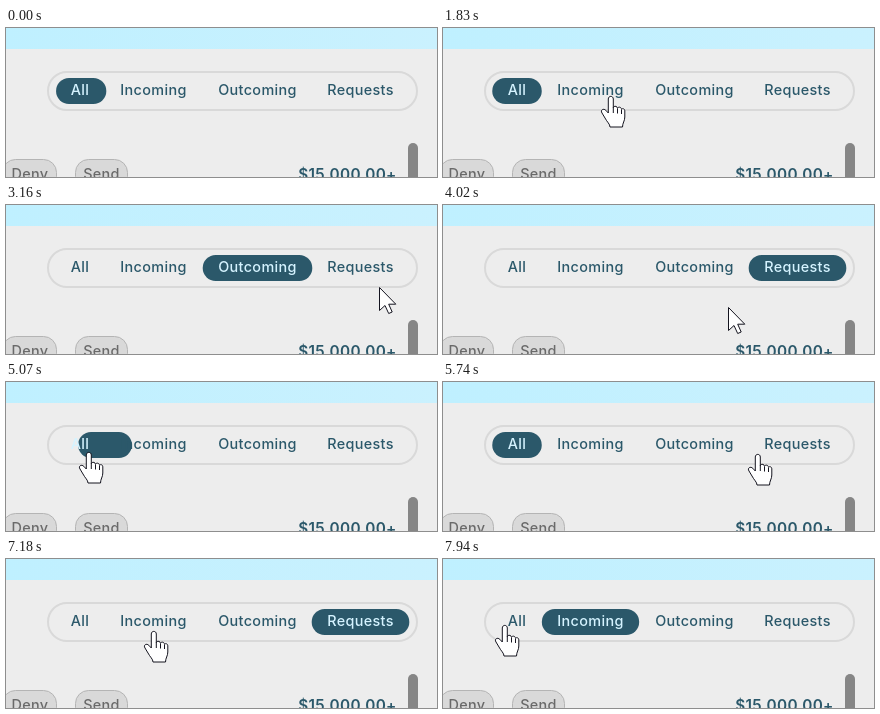
An HTML page for the animation above (8 s loop, 431 by 149 pixels).

```html
<!DOCTYPE html>
<html lang="en">
<head>
<meta charset="utf-8">
<title>Sliding tab filter</title>
<style>
  html, body { margin: 0; width: 100%; height: 100%; overflow: hidden; background: #ededed; }
  svg { display: block; }
  text {
    font: 500 14.4px Inter, "Open Sans", sans-serif;
    letter-spacing: .35px;
    text-anchor: middle;
    fill: #2b586a;
  }
  .button rect { fill: #d9d9d9; stroke: #b4b4b4; }
  .button text { fill: #6a6a6a; }
  .total { font-size: 15.3px; font-weight: 600; }
  #cursor path { fill: #fff; stroke: #14141f; stroke-linejoin: round; }
</style>
</head>
<body>
<svg width="431" height="149" viewBox="0 0 431 149">
  <defs>
    <linearGradient id="sky">
      <stop stop-color="#bff0ff"/>
      <stop offset="1" stop-color="#caf1fe"/>
    </linearGradient>
  </defs>
  <rect width="431" height="149" fill="#ededed"/>
  <rect width="431" height="21" fill="url(#sky)"/>

  <g class="button">
    <rect x="-3.5" y="131.5" width="54" height="30" rx="13"/>
    <text x="24" y="151">Deny</text>
    <rect x="69.5" y="131.5" width="52" height="30" rx="13"/>
    <text x="95.5" y="151">Send</text>
  </g>
  <text class="total" x="341.5" y="151.5">$15,000.00+</text>
  <rect x="402" y="115" width="10" height="60" rx="5" fill="#868686"/>

  <rect x="42" y="44" width="369" height="38" rx="19" fill="none" stroke="#d9d9d9" stroke-width="2"/>
  <rect id="pill" y="50" height="26" rx="13" fill="#2b586a"/>
  <g id="tabs">
    <text x="74" y="67">All</text>
    <text x="147.5" y="67">Incoming</text>
    <text x="251.5" y="67">Outcoming</text>
    <text x="354.5" y="67">Requests</text>
  </g>

  <g id="cursor">
    <path id="arrow" d="M.5 .5V23.5L6 18.5 9.7 26.5 13.2 25 9.7 17.2H16.8Z"/>
    <path id="hand" d="M-2.7 3C-2.7-.5 2.3-.5 2.3 3V12c0-2.4 4.2-2.4 4.2 .5c.5-2 4-1.8 4 1c.8-1.5 3.3-1 3.3 1.5V21C13.8 25 11.5 27 11.5 31H-1C-1 28-4 26-6 22L-9 17c-2-3 1.5-5 3.8-2.7L-2.7 17ZM2.3 12v5M6.5 13v4.5M10.5 14v4"/>
  </g>
</svg>
<script>
const LOOP = 8000, FIRST = 200, STEP = 95.56;
const SLIDE = 500, FADE = 220, CLICK_DELAY = 180, PADDING = 15.5;
const ALL = 0, INCOMING = 1, OUTCOMING = 2, REQUESTS = 3;
const DARK = [43, 88, 106], LIGHT = [213, 243, 255];

// places the cursor visits; dip is how far the way there sags, tab is what gets clicked
const stops = [
  { arrive: 1440, leave: 1440, x: 180, y: 140 },
  { arrive: 1830, leave: 2110, x: 168, y: 68, dip: 0, tab: INCOMING },
  { arrive: 2480, leave: 2740, x: 252, y: 50, dip: 0, tab: OUTCOMING },
  { arrive: 3160, leave: 3160, x: 373, y: 82, dip: 0 },
  { arrive: 3260, leave: 3730, x: 362, y: 48, dip: 0, tab: REQUESTS },
  { arrive: 4573, leave: 5360, x: 83, y: 70, dip: 50, tab: ALL },
  { arrive: 5845, leave: 6400, x: 345, y: 72, dip: 2, tab: REQUESTS },
  { arrive: 7030, leave: 7420, x: 148, y: 72, dip: 20, tab: INCOMING },
  { arrive: 7940, leave: LOOP, x: 62, y: 66, dip: 13 }
];

const clicks = [
  { at: -1000, tab: INCOMING },
  { at: -313, tab: ALL },
  ...stops.filter(s => "tab" in s).map(s => ({ at: s.arrive + CLICK_DELAY, tab: s.tab }))
];

const $ = id => document.getElementById(id);
const labels = [...$("tabs").children];
const slots = labels.map(label => {
  const middle = +label.getAttribute("x");
  const half = label.getComputedTextLength() / 2 + PADDING;
  return [middle - half, middle + half];
});

const clamp = v => Math.max(0, Math.min(1, v));
const mix = (a, b, p) => a + (b - a) * p;
const smooth = p => p * p * (3 - 2 * p);

// cubic-bezier(.25, .1, .25, 1)
function ease(x) {
  if (x <= 0 || x >= 1) return clamp(x);
  const curve = (u, a, b) => 3 * u * (1 - u) * (a * (1 - u) + b * u) + u ** 3;
  let lo = 0, hi = 1;
  for (let i = 0; i < 24; i++) {
    const mid = (lo + hi) / 2;
    if (curve(mid, .25, .25) < x) lo = mid; else hi = mid;
  }
  return curve(lo, .1, 1);
}

function drawTabs(t) {
  const i = clicks.findLastIndex(c => c.at <= t);
  const { at, tab } = clicks[i], before = clicks[i - 1].tab;
  const p = ease((t - at) / SLIDE);
  const [left, right] = slots[tab].map((edge, k) => mix(slots[before][k], edge, p));
  $("pill").setAttribute("x", left);
  $("pill").setAttribute("width", right - left);

  const fade = clamp((t - at) / FADE);
  labels.forEach((label, k) => {
    const lit = k === tab ? fade : k === before ? 1 - fade : 0;
    label.style.fill = `rgb(${DARK.map((c, j) => Math.round(mix(c, LIGHT[j], lit)))})`;
  });
}

function cursorAt(t) {
  const i = Math.max(1, stops.findIndex(s => t <= s.leave));
  const from = stops[i - 1], to = stops[i];
  const p = clamp((t - from.leave) / (to.arrive - from.leave));
  const sag = to.dip * Math.sin(Math.PI * Math.sqrt(p));
  return [mix(from.x, to.x, smooth(p)), mix(from.y, to.y, smooth(p)) + sag].map(Math.round);
}

const show = (id, on) => $(id).style.display = on ? "" : "none";

function drawCursor(t) {
  const [x, y] = cursorAt(t);
  const over = y < 77 && x >= slots[ALL][0] && x <= slots[REQUESTS][1];
  show("cursor", t >= stops[0].arrive - 10);
  show("hand", over);
  show("arrow", !over);
  $("cursor").setAttribute("transform", `translate(${x} ${y})`);
}

function draw(now) {
  // motion advances in even steps
  const step = Math.max(-1, Math.floor((now % LOOP - FIRST + 6) / STEP));
  const t = FIRST + step * STEP;
  drawTabs(t);
  drawCursor(t);
}

let origin;
function tick(now) {
  origin ??= now;
  draw(now - origin);
  requestAnimationFrame(tick);
}
draw(0);
requestAnimationFrame(tick);
</script>
</body>
</html>
```
